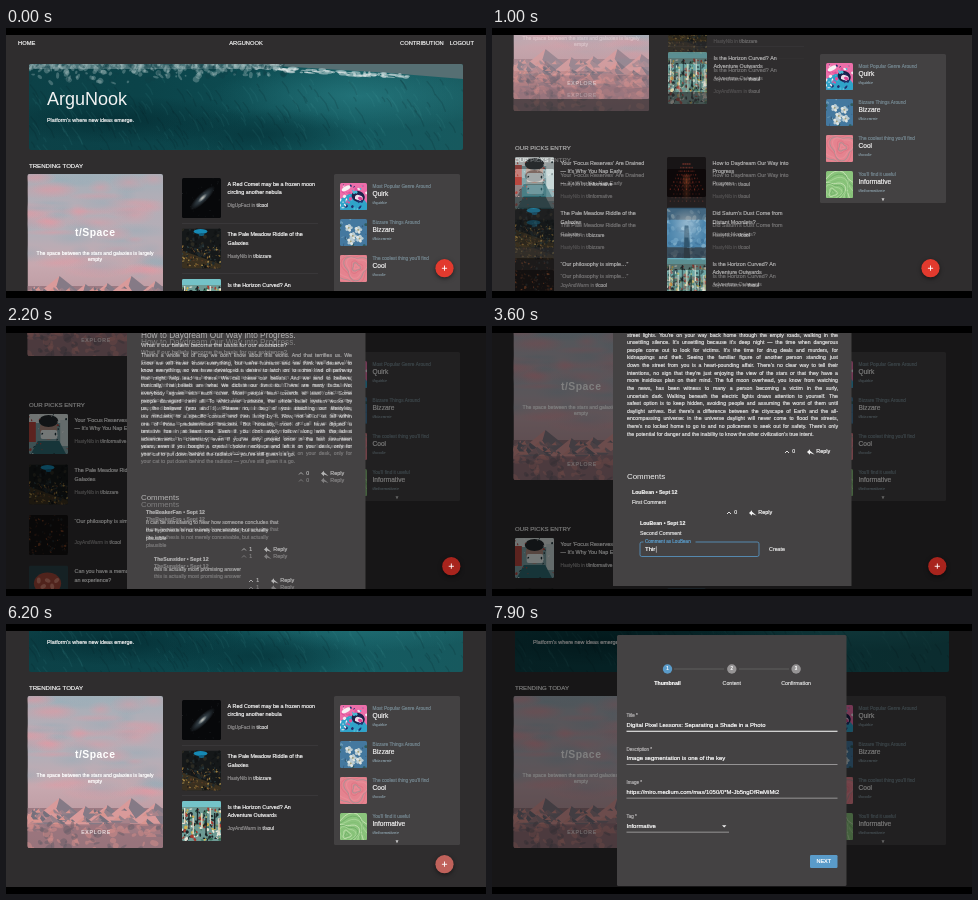
Animation of 480 by 270 pixels, one loop 8000 ms. Source, as an HTML page with a canvas:

```html
<!DOCTYPE html>
<html lang="en">
<head>
<meta charset="utf-8">
<title>ArguNook</title>
<style>
html, body { margin: 0; width: 100%; height: 100%; overflow: hidden; background: #000; }
canvas { display: block; width: 480px; height: 270px; }
</style>
</head>
<body>
<canvas id="stage" width="480" height="270"></canvas>
<script>
const LOOP = 8000, STEP = 100;
const FONT = '"Liberation Sans", Arial, sans-serif';
const BG = '#2f2d2e', PANEL = '#444243', WHITE = '#f2f2f2', GREY = '#8d8b8c', BLUE = '#5a9bc9';
const stage = document.getElementById('stage').getContext('2d');
const buffer = Object.assign(document.createElement('canvas'), { width: 480, height: 270 });
let c = stage;

// ---------- helpers ----------
const clamp = v => Math.max(0, Math.min(1, v));

function track(t, keys) {
  if (t <= keys[0][0]) return keys[0][1];
  for (let i = 1; i < keys.length; i++) {
    const [t0, a] = keys[i - 1], [t1, b] = keys[i];
    if (t <= t1) return a + (b - a) * (t - t0) / (t1 - t0);
  }
  return keys[keys.length - 1][1];
}

const typed = (s, t, start, end) => s.slice(0, Math.round(s.length * clamp((t - start) / (end - start))));

function random(seed) {
  return () => (seed = (seed * 16807) % 2147483647) / 2147483647;
}

function text(s, x, y, size, color = WHITE, { bold, align = 'left', spacing = 0 } = {}) {
  c.font = `${bold ? 'bold ' : ''}${size}px ${FONT}`;
  c.textAlign = align;
  c.textBaseline = 'middle';
  c.letterSpacing = spacing + 'px';
  c.fillStyle = c.strokeStyle = color;
  c.fillText(s, x, y);
  if (size < 7) {
    // A hairline keeps very small type crisp.
    c.lineWidth = 0.2;
    c.strokeText(s, x, y);
  }
  const width = c.measureText(s).width;
  c.letterSpacing = '0px';
  return width;
}

function paragraph(lines, x, y, width) {
  lines.forEach((s, i) => {
    c.font = `5.2px ${FONT}`;
    const gap = (width - c.measureText(s).width) / (s.split(' ').length - 1);
    c.wordSpacing = (i < lines.length - 1 || gap < 1 ? gap : 0) + 'px';
    text(s, x, y + i * 7.62, 5.2, '#dedede');
    c.wordSpacing = '0px';
  });
}

function box(x, y, w, h, color, r = 0) {
  c.fillStyle = color;
  c.beginPath();
  c.roundRect(x, y, w, h, r);
  c.fill();
}

function oval(x, y, rx, ry, color, turn = 0) {
  c.fillStyle = color;
  c.beginPath();
  c.ellipse(x, y, rx, ry, turn, 0, 7);
  c.fill();
}

function polygon(points, color) {
  c.fillStyle = color;
  c.beginPath();
  points.forEach(([x, y]) => c.lineTo(x, y));
  c.fill();
}

function line(points, color, width = 0.6) {
  c.strokeStyle = color;
  c.lineWidth = width;
  c.beginPath();
  points.forEach(([x, y]) => c.lineTo(x, y));
  c.stroke();
}

function gradient(x1, y1, ...colors) {
  const g = c.createLinearGradient(0, 0, x1, y1);
  colors.forEach((k, i) => g.addColorStop(i / (colors.length - 1), k));
  return g;
}

function glow(x, y, rx, ry, rgb, alpha) {
  c.save();
  c.translate(x, y);
  c.scale(rx, ry);
  const g = c.createRadialGradient(0, 0, 0, 0, 0, 1);
  g.addColorStop(0, `rgba(${rgb},${alpha})`);
  g.addColorStop(1, `rgba(${rgb},0)`);
  oval(0, 0, 1, 1, g);
  c.restore();
}

function specks(colors, count, size, seed, w = 40, h = 40, top = 0) {
  const r = random(seed);
  for (let i = 0; i < count; i++)
    oval(r() * w, top + r() * h, size * (0.3 + r()), size * (0.3 + r()), colors[i % colors.length], r() * 3);
}

function waves(colors, width, cx, cy) {
  for (let i = 14; i > 0; i--) {
    c.strokeStyle = colors[i % colors.length];
    c.lineWidth = width;
    c.beginPath();
    for (let a = 0; a < 6.4; a += 0.2) {
      const d = i * 2.8 * (1 + 0.22 * Math.sin(a * 3 + i * 0.5));
      c.lineTo(cx + d * Math.cos(a), cy + d * Math.sin(a));
    }
    c.stroke();
  }
}

// ---------- pictures, drawn on a 40 x 40 square ----------
const art = {
  galaxy: ['#07080a', () => {
    specks(['#34383c', '#1f2326'], 30, 0.4, 11);
    c.save();
    c.translate(21, 20);
    c.rotate(-0.75);
    glow(0, 0, 17, 5, '96,118,132', 0.75);
    glow(0, 0, 6, 2.2, '225,222,210', 0.8);
    c.restore();
  }],
  forest: ['#151819', () => {
    polygon([[0, 22], [40, 36], [40, 40], [0, 40]], '#3a301f');
    specks(['#20292b', '#101314', '#2b2a22'], 70, 1.6, 27);
    specks(['#8a6a33', '#2b3d40', '#a08344', '#5a3a24', '#1b1c1c'], 110, 0.9, 31, 40, 24, 17);
    oval(19, 3, 7, 2.4, '#1689b4');
    oval(20, 6, 3, 1.5, '#125f80');
  }],
  crowd: ['#6d9a94', () => {
    specks(['#e9e6d8', '#a63a30', '#d0b14c', '#1a2629', '#39705a', '#1f2a2c'], 150, 1.6, 43, 40, 32, 8);
    box(0, 0, 40, 6, '#74c3c8');
    for (let i = 0; i < 9; i++) box(2 + i * 4.4, 7 + (i % 3) * 5, 1.4, 16, i % 2 ? '#1c2528' : '#ded9c8');
  }],
  reader: ['#7fa3a8', () => {
    box(0, 0, 40, 9, '#dfe7e6');
    box(0, 8, 7, 20, '#b9473f');
    box(32, 6, 8, 26, '#c9d8d8');
    oval(20, 15, 9, 11, '#b08d80'); oval(20, 7, 10, 6, '#23292c');
    box(12, 16, 17, 9, '#e8efee', 2); polygon([[2, 40], [9, 27], [31, 27], [38, 40]], '#2e6a73');
    specks(['#f2f4f2', '#1d3338', '#b9473f'], 30, 1.1, 8);
  }],
  lamp: ['#0d0809', () => {
    for (let i = 0; i < 8; i++) for (let j = -4; j <= 4; j++)
      oval(20 + j * (1 + i * 0.45), 7 + i * 3.6, 0.7, 0.9, (i + j) % 2 ? '#7c2c20' : '#4a1b16');
    glow(20, 24, 5, 9, '200,100,50', 0.6);
  }],
  water: ['#4d86ad', () => {
    specks(['#6fa3c4', '#3c7199', '#8fbad2'], 40, 2.6, 71);
    glow(20, 14, 18, 13, '226,238,244', 0.7);
    polygon([[17, 40], [18, 18], [22, 18], [24, 40]], '#31566f');
  }],
  embers: ['#131010', () => specks(['#3a2219', '#6d3a20', '#202628', '#261a15'], 90, 1, 83)],
  brain: ['#2b4248', () => {
    oval(19, 18, 14, 11, '#a14639'); oval(24, 28, 4, 7, '#8e3c32');
    for (let i = 0; i < 5; i++) oval(10 + i * 4.6, 15 + (i % 2) * 6, 2, 3, '#d07f6d', i);
  }],
  quirk: ['#ec6ea9', () => {
    polygon([[0, 24], [14, 16], [30, 18], [40, 30], [40, 40], [0, 40]], '#2fa3c9');
    oval(27, 20, 10, 8, '#1c2148', 0.4);
    oval(28, 22, 6, 4, '#f0d7e6', 0.4);
    oval(30, 23, 3.5, 2.4, '#d94392', 0.4);
    specks(['#f4e9f0', '#e04f9a', '#20306f', '#48b9d4'], 45, 2, 29);
    oval(9, 8, 7, 3, '#f7f0f3', -0.5);
  }],
  bizarre: ['#44789f', () => {
    specks(['#2f5a5c', '#6e9cb6', '#375f80'], 24, 2, 17);
    [[13, 13], [27, 16], [19, 25], [29, 29], [16, 33]].forEach(([x, y]) => {
      for (let a = 0; a < 5; a++) oval(x + 3.2 * Math.cos(a * 1.26), y + 3.2 * Math.sin(a * 1.26), 2.8, 2.2, a % 2 ? '#dfe4e0' : '#b9cbd2', a);
      oval(x, y, 1.3, 1.3, '#a8a071');
    });
  }],
  cool: ['#e5838f', () => waves(['#e5838f', '#e88f99', '#b08f93', '#df7886'], 1.5, 24, 18)],
  useful: ['#8bc47c', () => waves(['#a9d898', '#6fae66', '#c4e2b2', '#83c075'], 1.4, 10, 32)]
};

function picture(name, x, y, w, h) {
  const [color, paint] = art[name];
  c.save();
  c.beginPath();
  c.roundRect(x, y, w, h, 1.5);
  c.clip();
  box(x, y, w, h, color);
  c.translate(x, y);
  c.scale(w / 40, h / 40);
  paint();
  c.restore();
}

function hero() {
  c.save();
  c.translate(23, 36);
  c.beginPath();
  c.roundRect(0, 0, 434, 86, 2);
  c.clip();
  box(0, 0, 434, 86, gradient(434, 0, '#0c4147', '#0b4349', '#0d4b51', '#145a60', '#17595e'));
  glow(330, 32, 150, 34, '44,130,136', 0.6);
  glow(90, 56, 130, 24, '2,38,44', 0.6);
  glow(230, 70, 110, 26, '2,40,46', 0.5);
  const r = random(5);
  for (let i = 0; i < 240; i++) {
    const x = r() * 434, y = 14 + r() * 72, n = 4 + r() * 14;
    line([[x, y], [x + n * 0.4, y + n * 0.5], [x + n * 0.6, y + n]], i % 2 ? 'rgba(80,160,162,.09)' : 'rgba(0,28,34,.16)', 1.3);
  }
  // Sky to the right, with a thin breaking crest sloping down below it.
  const crest = x => 2 + 12 * Math.max(0, (x - 230) / 204);
  polygon([[215, 0], [280, 4], [360, 9], [434, 15], [434, 0]], '#566f73');
  for (let i = 0; i < 80; i++) {
    const x = 225 + r() * 160;
    oval(x, crest(x) + r() * 4, 1 + r() * 5, 0.5 + r() * 1.2, 'rgba(226,234,234,.5)', 0.08);
  }
  // Spray falling on the left.
  box(0, 0, 250, 5, 'rgba(140,166,170,.5)');
  for (let i = 0; i < 320; i++) {
    const x = r() * 255, y = r() * r() * 24 * (1 - x / 600);
    oval(x, y, 0.8 + r() * 2.6, 0.8 + r() * 2.6, i % 3 ? 'rgba(176,198,200,.32)' : 'rgba(16,62,70,.42)', r());
  }
  c.restore();
  text('ArguNook', 41, 72.5, 18);
  text("Platform's where new ideas emerge.", 41, 93, 5.4);
}

function mountain(x, y, size, lit, shade) {
  polygon([[x, y], [x - size, y + size * 0.8], [x + size * 0.2, y + size * 0.8], [x - size * 0.1, y + size * 0.35]], lit);
  polygon([[x, y], [x - size * 0.1, y + size * 0.35], [x + size * 0.2, y + size * 0.8], [x + size, y + size * 0.8]], shade);
}

function spaceCard() {
  c.save();
  c.translate(21.5, 146);
  c.beginPath();
  c.roundRect(0, 0, 135.5, 152, 2);
  c.clip();
  box(0, 0, 136, 152, gradient(0, 152, '#a3b0b9', '#b5adb6', '#b3aeb7', '#c7a8af', '#bd9ba2', '#a58a92'));
  const r = random(19);
  for (let i = 0; i < 60; i++)
    glow(r() * 135, r() * 100, 10 + r() * 26, 3 + r() * 7, i % 2 ? '232,150,160' : '146,172,184', 0.4);
  box(0, 112, 136, 40, gradient(0, 152, '#a58790', '#a98088', '#8d737c'));
  [[8, 112, 24], [32, 102, 30], [58, 110, 24], [80, 109, 22], [104, 102, 28], [128, 107, 26]]
    .forEach(([x, y, size]) => mountain(x, y, size, '#d99a9a', '#857a86'));
  for (let i = 0; i < 70; i++) {
    const x = r() * 136, y = 112 + r() * 22, size = 3 + r() * 7;
    mountain(x, y, size, i % 3 ? '#d8948f' : '#a8838a', i % 2 ? '#75707c' : '#97818a');
  }
  box(0, 128, 136, 24, 'rgba(160,118,124,.55)');
  specks(['rgba(214,142,138,.5)', 'rgba(104,94,104,.5)'], 60, 3.5, 37, 136, 26, 128);
  c.restore();
  text('t/Space', 89.2, 205.3, 10.4, '#fff', { bold: true, align: 'center', spacing: 0.5 });
  text('The space between the stars and galaxies is largely', 89, 225.5, 5.1, '#fff', { align: 'center' });
  text('empty', 89, 231.5, 5.1, '#fff', { align: 'center' });
  text('EXPLORE', 90, 283, 5.1, '#eadcdd', { align: 'center', spacing: 0.8 });
}

// ---------- page ----------
const POSTS = {
  comet: ['galaxy', 'A Red Comet may be a frozen moon', 'circling another nebula', 'DigUpFact', 't/cool'],
  meadow: ['forest', 'The Pale Meadow Riddle of the', 'Galaxies', 'HastyNib', 't/bizzare'],
  horizon: ['crowd', 'Is the Horizon Curved? An', 'Adventure Outwards', 'JoyAndWarm', 't/soul'],
  focus: ['reader', "Your 'Focus Reserves' Are Drained", "— It's Why You Nap Early", 'HastyNib', 't/informative'],
  dream: ['lamp', 'How to Daydream Our Way into', 'Progress', 'HastyNib', 't/soul'],
  dust: ['water', "Did Saturn's Dust Come from", 'Distant Moonlets?', 'HastyNib', 't/cool'],
  simple: ['embers', '“Our philosophy is simple…”', '', 'JoyAndWarm', 't/cool'],
  memory: ['brain', 'Can you have a memory of', 'an experience?', 'HastyNib', 't/quirk']
};

function post(key, x, y) {
  const [image, first, second, author, topic] = POSTS[key];
  picture(image, x, y, 39, 40);
  text(first, x + 45.5, y + 6.3, 5.4);
  text(second, x + 45.5, y + 14.8, 5.4);
  const w = text(author + ' in ', x + 45.5, y + 28, 4.8, GREY);
  text(topic, x + 45.5 + w, y + 28, 4.8, '#dcdcdc');
}

function sidebar(y) {
  box(328, y, 126, 149, '#434142', 1.5);
  [['quirk', 'Most Popular Genre Around', 'Quirk', 't/quirk>'],
   ['bizarre', 'Bizzare Things Around', 'Bizzare', 't/bizzare>'],
   ['cool', "The coolest thing you'll find", 'Cool', 't/cool>'],
   ['useful', "You'll find it useful", 'Informative', 't/informative>']
  ].forEach(([image, label, name, link], i) => {
    const top = y + 9 + i * 36;
    picture(image, 334, top, 27, 27);
    text(label, 366.5, top + 3.8, 4.7, '#74868f');
    text(name, 366.5, top + 11.5, 6.6);
    text(link, 366.5, top + 19.7, 4.4, '#80929b');
  });
  text('▾', 391, y + 145.5, 5, '#ddd', { align: 'center' });
}

function page(scroll) {
  c.save();
  c.translate(0, -scroll);
  text('HOME', 12, 15.5, 5.75);
  text('ARGUNOOK', 240, 15.5, 5.75, WHITE, { align: 'center' });
  text('CONTRIBUTION', 394, 15.5, 5.75);
  text('LOGOUT', 468, 15.5, 5.75, WHITE, { align: 'right' });
  hero();
  text('TRENDING TODAY', 23, 138, 6.1);
  spaceCard();
  ['comet', 'meadow', 'horizon'].forEach((key, i) => {
    post(key, 176, 150 + i * 50.5);
    if (i) box(176, 144.5 + i * 50.5, 136, 0.6, '#454344');
  });
  sidebar(Math.max(146, scroll + 26));
  text('OUR PICKS ENTRY', 23, 347.5, 6.1);
  ['focus', 'meadow', 'simple', 'memory'].forEach((key, i) => post(key, 23, 356 + i * 50.5));
  ['dream', 'dust', 'horizon', 'comet'].forEach((key, i) => post(key, 175, 356 + i * 50.5));
  c.restore();
}

function addButton(x, color) {
  c.save();
  c.shadowColor = 'rgba(0,0,0,.5)';
  c.shadowBlur = 4;
  c.shadowOffsetY = 1.5;
  oval(x, 240.2, 9.1, 9.1, color);
  c.restore();
  box(x - 2.6, 239.8, 5.2, 0.9, '#fff');
  box(x - 0.45, 237.6, 0.9, 5.2, '#fff');
}

// ---------- article dialogs ----------
function votes(x, y, count) {
  line([[x - 2, y + 1], [x, y - 1], [x + 2, y + 1]], WHITE, 0.9);
  text(count, x + 5.2, y, 5.2);
  polygon([[20, 0], [23, -2.8], [23, -1.2], [27.5, 2.6], [23, 1], [23, 2.8]].map(([dx, dy]) => [x + dx, y + dy]), WHITE);
  text('Reply', x + 29.3, y, 5.4);
}

function comment(author, x, y, lines) {
  text(author + ' • Sept 12', x, y, 5.2, WHITE, { bold: true });
  lines.forEach((s, i) => text(s, x, y + 10 + i * 7.6, 5.2, '#dedede'));
}

function replyField(y, value, focused) {
  c.strokeStyle = focused ? BLUE : '#262526';
  c.lineWidth = 0.8;
  c.beginPath();
  c.roundRect(148, y, 119, 14.5, 1.8);
  c.stroke();
  box(151.5, y - 1, 52, 2, PANEL);
  text('Comment as LouBean', 153, y, 4.6, BLUE);
  const w = text(value, 153, y + 7.5, 6, '#fff');
  if (focused) box(153.6 + w, y + 4.2, 0.5, 6.5, '#fff');
  else box(270, y + 1, 30, 12.5, '#575556', 6);
  text('Create', 285, y + 7.3, 5.3, '#e4e4e4', { align: 'center' });
}

const BELIEFS = [
  "There's a whole lot of crap we don't know about this world. And that terrifies us. We",
  "know we will never know everything, but we're humans and we think we deserve to",
  'know everything, so we have developed a desire to latch on to some kind of pathway',
  'that might help lead us there. We call these our beliefs. And we tend to believe,',
  'ironically, that beliefs are what we dictate our lives to. There are many facts. Not',
  'everybody agrees with each other. Most people lean towards at least one. Some',
  'people disregard them all. To whichever instance, the whole belief system works by',
  'us, the believer (you and I). Please no, I beg of you attaching our lifestyles,',
  "our mindsets, to a specific context and then living by it. Now, not all of us fall within",
  'one of those predetermined brackets. But honestly, most of us have dipped a',
  "tentative toe in at least one. Even if you don't avidly follow along with the latest",
  "advancements in chemistry, even if you've only prayed once in the last seventeen",
  'years, even if you bought a crystal choker necklace and left it on your desk, only for',
  "your cat to put down behind the radiator — you've still given it a go."
];

const NIGHT = [
  "street lights. You're on your way back home through the empty roads, walking in the",
  "unsettling silence. It's unsettling because it's deep night — the time when dangerous",
  "people come out to look for victims. It's the time for drug deals and murders, for",
  'kidnappings and theft. Seeing the familiar figure of another person standing just',
  'down the street from you is a heart-pounding affair. There’s no clear way to tell their',
  "intentions, no sign that they're just enjoying the view of the stars or that they have a",
  'more insidious plan on their mind. The full moon overhead, you know from watching',
  'the news, has been witness to many a person becoming a victim in the surly,',
  'uncertain dark. Walking beneath the electric lights draws attention to yourself. The',
  'safest option is to keep hidden, avoiding people and assuming the worst of them until',
  "daylight arrives. But there's a difference between the cityscape of Earth and the all-",
  'encompassing universe: in the universe daylight will never come to flood the streets,',
  "there's no locked home to go to and no policemen to seek out for safety. There's only",
  "the potential for danger and the inability to know the other civilization's true intent."
];

function beliefArticle() {
  picture('lamp', 135, -94, 211, 90);
  text('How to Daydream Our Way into Progress.', 135, 10, 8.3);
  text('What if our beliefs become the basis for our existence?', 135, 19.5, 6);
  paragraph(BELIEFS, 135, 29.5, 211);
  votes(295, 147.5, '0');
  text('Comments', 135, 172, 7.9);
  comment('TheBeakerFan', 140, 187, [
    'It can be stimulating to hear how someone concludes that',
    'the hypothesis is not merely conceivable, but actually', 'plausible']);
  votes(238, 223.5, '1');
  comment('TheSunsider', 148, 234, ['this is actually most promising answer']);
  votes(245, 255, '1');
}

function nightArticle(t) {
  picture('forest', 135, -126, 211, 90);
  text('The Pale Meadow Riddle of the Galaxies', 135, -22, 8.3);
  text('Who else is walking through the night?', 135, -10, 6);
  paragraph(NIGHT, 135, 9.2, 211);
  votes(295, 126, '0');
  text('Comments', 135, 150.5, 7.9);
  if (t < 3100) return replyField(163, typed('First Comment', t, 2900, 3050), true);
  comment('LouBean', 140, 166.5, ['First Comment']);
  votes(237, 187, '0');
  if (t < 3300) return replyField(199, typed('Second Comment', t, 3100, 3250), true);
  comment('LouBean', 148, 198, ['Second Comment']);
  if (t < 5100) return replyField(216, typed('Third nested comment', t, 3350, 4600), t < 4800);
  votes(245, 219, '0');
  comment('LouBean', 156, 230.5, ['Third nested comment']);
  votes(253, 251.5, '0');
}

// ---------- new entry dialog ----------
function entryForm(t) {
  box(125, 11, 229.5, 251, PANEL, 1.5);
  box(182, 44.7, 50, 0.5, '#777');
  box(247, 44.7, 50, 0.5, '#777');
  ['Thumbnail', 'Content', 'Confirmation'].forEach((label, i) => {
    const x = 175.5 + i * 64.3;
    oval(x, 45, 4.7, 4.7, i ? '#969495' : BLUE);
    text(i + 1, x, 45.2, 4.5, '#fff', { align: 'center' });
    text(label, x, 60, 5.25, i ? '#dcdcdc' : '#fff', { align: 'center', bold: !i });
  });
  const row = (label, value, y, width, active) => {
    text(label + ' *', 134.5, y - 9, 4.5, '#b5b3b4');
    text(value, 134.5, y, 5.95, '#fff');
    box(134.5, y + 5.8, width, active ? 1 : 0.6, active ? '#fff' : '#b0aeaf');
  };
  row('Title', typed('Digital Pixel Lessons: Separating a Shade in a Photo', t, 6600, 6900), 101, 211, true);
  row('Description', typed('Image segmentation is one of the key', t, 6900, 7300), 134.5, 211);
  row('Image', t < 7400 ? '' : 'https://miro.medium.com/max/1050/0*M-Jb5ngDfReMiMt2', 168, 211);
  row('Tag', t < 7700 ? '' : 'Informative', 202, 102.5);
  polygon([[230, 201.2], [234.4, 201.2], [232.2, 203.5]], WHITE);
  box(318, 231, 27.5, 13, BLUE, 1.2);
  text('NEXT', 331.8, 237.6, 5.5, '#fff', { align: 'center' });
}

// ---------- timeline ----------
function stateAt(t) {
  return {
    scroll: track(t, [[100, 0], [500, 110], [800, 195], [900, 215], [1000, 227], [1400, 268], [2600, 268], [2700, 144], [5800, 144], [6100, 74]]),
    dialog: t < 2700 ? 'beliefs' : t < 6200 ? 'night' : 'form',
    shown: track(t, [[1500, 0], [1700, 1], [5800, 1], [6000, 0], [6300, 0], [6600, 1]]),
    offset: t < 2700 ? track(t, [[1700, 112], [2100, 7], [2200, 0], [2600, -30]]) : track(t, [[2700, 140], [2900, 0]])
  };
}

function scene(target, t) {
  c = target;
  const { scroll, dialog, shown, offset } = stateAt(t);
  box(0, 0, 480, 270, '#000');
  c.save();
  c.beginPath();
  c.rect(0, 7, 480, 256);
  c.clip();
  box(0, 7, 480, 256, BG);
  page(scroll);
  if (!shown) addButton(438.5, t >= 6200 ? '#c0625b' : '#e23a2e');
  else {
    box(0, 7, 480, 256, `rgba(0,0,0,${0.5 * shown})`);
    if (dialog !== 'form') addButton(445.3, '#a8241d');
    c.globalAlpha = shown;
    if (dialog === 'form') entryForm(t);
    else {
      const bottom = dialog === 'night' ? Math.min(263, 260 + offset) : 263;
      box(121, 7, 238.5, bottom - 7, PANEL);
      c.translate(0, offset);
      dialog === 'night' ? nightArticle(t) : beliefArticle();
    }
  }
  c.restore();
}

function draw(t) {
  scene(stage, t);
  const now = stateAt(t), before = stateAt(t - STEP);
  if (now.scroll === before.scroll && now.offset === before.offset) return;
  // Fast scrolling leaves a faint copy of the previous position.
  scene(buffer.getContext('2d'), t - STEP);
  stage.globalAlpha = 0.35;
  stage.drawImage(buffer, 0, 0);
  stage.globalAlpha = 1;
}

let start, last;
function tick(now) {
  start ??= now;
  const t = Math.floor(((now - start) % LOOP) / STEP) * STEP;
  if (t !== last) draw(last = t);
  requestAnimationFrame(tick);
}
requestAnimationFrame(tick);
</script>
</body>
</html>
```
